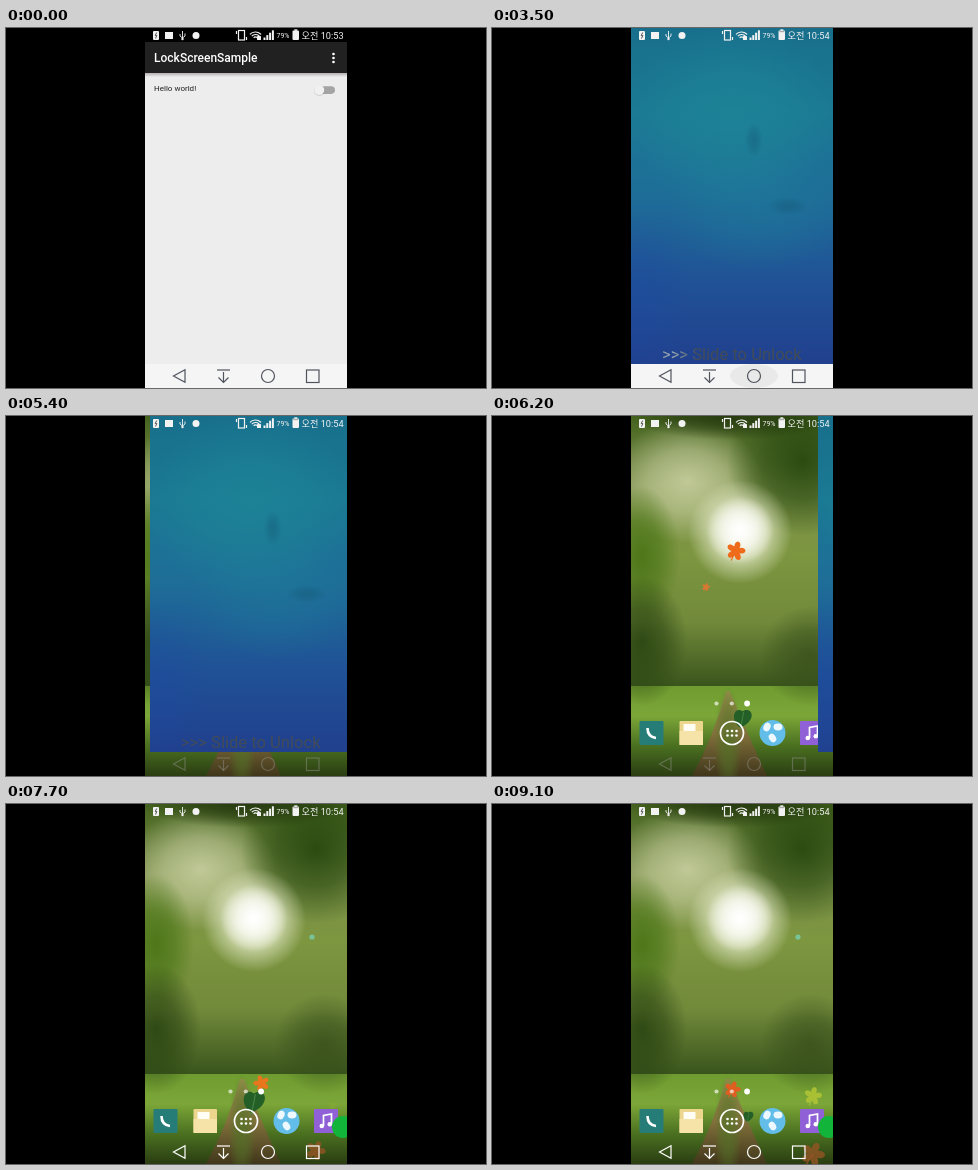
Animation, 480 px wide and 360 px high, one loop 9200 ms. Source, as an HTML page with a canvas:

```html
<!DOCTYPE html>
<html lang="en">
<head>
<meta charset="utf-8">
<title>Lock screen demo</title>
<style>
html, body { margin: 0; width: 100%; height: 100%; overflow: hidden; background: #000; }
canvas { display: block; }
</style>
</head>
<body>
<canvas id="stage" width="480" height="360"></canvas>
<script>
const LOOP = 9200, STEP = 100;
const L = 139, W = 202, H = 360, NAV = 336;
const FONT = 'Roboto, "Noto Sans CJK KR", "Noto Sans CJK", sans-serif';
const ctx = document.getElementById('stage').getContext('2d');

const clamp = v => Math.max(0, Math.min(1, v));
const ramp = (t, a, b) => clamp((t - a) / (b - a));
const smooth = u => u * u * (3 - 2 * u);

function layer(draw) {
  const c = document.createElement('canvas');
  c.width = W;
  c.height = H;
  const g = c.getContext('2d');
  g.translate(-L, 0);
  draw(g);
  return c;
}

// Evenly spaced vertical gradient
function vertical(g, y0, y1, ...colors) {
  const f = g.createLinearGradient(0, y0, 0, y1);
  colors.forEach((c, i) => f.addColorStop(i / (colors.length - 1), c));
  return f;
}

function band(g, y, h, ...colors) {
  g.fillStyle = colors.length > 1 ? vertical(g, y, y + h, ...colors) : colors[0];
  g.fillRect(L, y, W, h);
}

function glow(g, x, y, rx, ry, hsl, alpha) {
  g.save();
  g.translate(x, y);
  g.scale(rx, ry);
  const f = g.createRadialGradient(0, 0, 0, 0, 0, 1);
  f.addColorStop(0, `hsl(${hsl} / ${alpha})`);
  f.addColorStop(0.5, `hsl(${hsl} / ${alpha * 0.65})`);
  f.addColorStop(1, `hsl(${hsl} / 0)`);
  g.fillStyle = f;
  g.fillRect(-1, -1, 2, 2);
  g.restore();
}

function line(...pts) {
  ctx.beginPath();
  for (let i = 0; i < pts.length; i += 2) ctx.lineTo(pts[i], pts[i + 1]);
  ctx.stroke();
}

function disc(x, y, r, color) {
  ctx.fillStyle = color;
  ctx.beginPath();
  ctx.arc(x, y, r, 0, 7);
  ctx.fill();
}

function ring(x, y, r, from = 0, to = 7) {
  ctx.beginPath();
  ctx.arc(x, y, r, from, to);
  ctx.stroke();
}

function box(x, y, w, h, r, color) {
  ctx.fillStyle = color;
  ctx.beginPath();
  ctx.roundRect(x, y, w, h, r);
  ctx.fill();
}

function pen(color, width) {
  ctx.strokeStyle = color;
  ctx.lineWidth = width;
}

function text(str, x, y, size, color, weight = 400) {
  ctx.font = `${weight} ${size}px ${FONT}`;
  ctx.fillStyle = color;
  ctx.fillText(str, x, y);
}

// The woodland photo as soft tones: canopy, glade, undergrowth, meadow, path, sun
const forest = layer(g => {
  band(g, 0, 275, '#45641f', '#7b8f4a', '#7d9640', '#71893a', '#35501a');
  band(g, 270, 90, '#6f9c30', '#7ca638', '#4a7020', '#2a3d12');
  glow(g, 195, 65, 75, 62, '66 38% 78%', 0.75);
  glow(g, 310, 45, 75, 75, '95 70% 16%', 0.9);
  glow(g, 150, 140, 38, 70, '88 72% 26%', 0.85);
  glow(g, 150, 225, 45, 65, '92 60% 16%', 0.85);
  glow(g, 318, 240, 50, 50, '88 50% 20%', 0.7);
  glow(g, 240, 0, 105, 24, '88 60% 12%', 0.8);
  g.fillStyle = vertical(g, 275, H, '#94904a', '#82713c', '#40361a');
  g.beginPath();
  g.moveTo(234, 275);
  g.quadraticCurveTo(222, 320, 200, H);
  g.lineTo(275, H);
  g.quadraticCurveTo(252, 310, 238, 275);
  g.fill();
  glow(g, 236, 325, 14, 55, '85 50% 30%', 0.8);
  glow(g, 248, 116, 52, 52, '65 60% 92%', 1);
  glow(g, 248, 114, 34, 34, '0 0% 100%', 1);
});

const wall = layer(g => {
  band(g, 0, NAV, '#186f8c', '#1b7994', '#1e6d98', '#205296', '#21408e');
  glow(g, 240, 90, 105, 95, '186 66% 36%', 0.5);
  glow(g, 265, 185, 90, 60, '194 68% 36%', 0.4);
  glow(g, 139, 270, 60, 85, '220 70% 37%', 0.4);
  glow(g, 262, 112, 9, 18, '198 70% 26%', 0.4);
  glow(g, 296, 178, 20, 9, '198 70% 26%', 0.4);
});

function statusBar(t) {
  const white = '#f2f2f2';
  box(147, 3, 6, 9, 1, white);
  pen('#555', 1);
  line(150.7, 4.5, 149.2, 7.5, 150.8, 7.5, 149.5, 10.5);
  box(159, 4, 8, 7, 0, white);
  pen(white, 0.9);
  line(176.5, 3, 176.5, 12);
  line(174, 6, 174, 8, 176.5, 10, 179, 8, 179, 5.5);
  disc(176.5, 11, 1.2, white);
  disc(190, 7.5, 3.5, white);

  pen(white, 1.2);
  ctx.strokeRect(232.5, 2.5, 6, 9.5);
  line(230.5, 3, 230.5, 6);
  line(240.5, 9, 240.5, 12);
  for (let r = 2.5; r < 8; r += 2.5) ring(249.5, 11.5, r, -2.4, -0.74);
  box(251, 8, 4, 4, 0.5, white);
  for (let i = 0; i < 4; i++) ctx.fillRect(257.5 + i * 2.8, 9.5 - i * 2.4, 2, 2.5 + i * 2.4);
  text('79%', 270.5, 10, 7, white);
  box(286.5, 2.5, 6.5, 9.5, 1, white);
  ctx.fillRect(288.3, 1.3, 3, 1.5);
  if (t >= 1000) box(287.3, 3, 5, 1.2, 0, '#aaa');
  text(t < 700 ? '오전 10:53' : '오전 10:54', 295.5, 10.5, 9.2, white);
}

function navBar(color) {
  pen(color, 1.2);
  line(179, 348, 179, 341.8, 167.5, 348, 179, 354.2, 179, 348);
  line(211, 342, 224, 342);
  line(217.5, 344, 217.5, 354.5);
  line(212.5, 349.5, 217.5, 354.5, 222.5, 349.5);
  ring(262, 348, 6.5);
  ctx.strokeRect(300.5, 342, 12.5, 12.5);
}

function lightNav(t) {
  band(ctx, NAV, H - NAV, '#f5f5f5');
  const press = ramp(t, 3300, 3500) * (1 - ramp(t, 3600, 3900));
  ctx.fillStyle = `rgba(0,0,0,${0.05 * press})`;
  ctx.beginPath();
  ctx.ellipse(262, 348, 24, 12, 0, 0, 7);
  ctx.fill();
  navBar('#50545e');
}

function app(t) {
  band(ctx, 0, 14, '#000');
  band(ctx, 14, 31, '#212121');
  band(ctx, 45, NAV - 45, '#ededed');
  band(ctx, 45, 4, '#b5aeb2', '#ededed');
  text('LockScreenSample', 148, 34, 12, '#fff', 500);
  for (let y = 26; y <= 34; y += 4) disc(327.5, y, 1.35, '#fff');
  text('Hello world!', 148, 63, 8, '#222');

  const on = smooth(ramp(t, 1700, 2200)), x = 313.3 + 12 * on;
  box(311, 58.3, 18, 7.6, 3.8, on > 0.5 ? '#82c4be' : '#a4a4a4');
  disc(x, 62.6, 5.3, 'rgba(0,0,0,.12)');
  disc(x, 62, 5, on > 0.5 ? '#009688' : '#f1f1f1');
  lightNav(t);
}

function dock() {
  for (let i = 0; i < 3; i++) {
    disc(224.5 + i * 15.3, 287.5, i < 2 ? 2.1 : 2.9, i < 2 ? 'rgba(255,255,255,.65)' : '#fff');
  }

  box(147.5, 305, 24, 24, 1, '#267d77');
  pen('#fff', 2.6);
  ctx.beginPath();
  ctx.moveTo(155.5, 312);
  ctx.quadraticCurveTo(155.5, 321, 164, 322);
  ctx.stroke();

  box(187.5, 305, 23.5, 24, 1, '#ecd58c');
  box(191.5, 308, 12, 7, 0.5, '#fffdf4');
  box(187.5, 315, 23.5, 14, 0, '#f5e3a8');

  pen('#fff', 1.7);
  ring(240, 317, 11.5);
  for (let i = 0; i < 6; i++) disc(235.5 + (i % 3) * 4.5, 315 + (i > 2 ? 4.5 : 0), 1.3, '#fff');

  disc(280.5, 317, 13, '#62bde8');
  for (let i = 0; i < 3; i++) {
    ctx.beginPath();
    ctx.ellipse(275 + i * 5.5, 311 + (i % 2) * 11, 4.5, 3.4, 2 - i, 0, 7);
    ctx.fillStyle = '#eef9ff';
    ctx.fill();
  }

  box(308, 305, 24, 24, 1, '#9060d6');
  line(317.5, 322, 317.5, 311.5, 325.5, 310, 325.5, 320);
  disc(315.8, 322, 2.3, '#fff');
  disc(323.8, 320.3, 2.3, '#fff');
  disc(337, 323, 11, '#12b53a');
}

function leaf(x, y, size, color, alpha, turn) {
  ctx.save();
  ctx.globalAlpha = alpha;
  ctx.translate(x, y);
  ctx.rotate(turn);
  ctx.scale(size, size);
  ctx.fillStyle = color;
  ctx.beginPath();
  for (let a = 0; a < 6.28; a += 0.1) {
    const r = 0.45 + 0.55 * Math.abs(Math.cos(2.5 * a));
    ctx.lineTo(r * Math.sin(a), -r * Math.cos(a));
  }
  ctx.fill();
  pen(color, 0.12);
  line(0, 0, -0.2, 1.1);
  ctx.restore();
}

function ivy(x, y, s) {
  ctx.save();
  ctx.translate(x, y);
  ctx.scale(s, s);
  ctx.fillStyle = '#245f28';
  ctx.beginPath();
  ctx.moveTo(-0.3, 0.95);
  ctx.bezierCurveTo(-1.3, 0.3, -0.9, -1.1, -0.1, -0.55);
  ctx.bezierCurveTo(0.7, -1.1, 1.4, 0.2, -0.3, 0.95);
  ctx.fill();
  pen('#4c8745', 0.08);
  line(0, -0.5, -0.3, 1.1);
  ctx.restore();
}

// Leaves drop out of the sunlight, growing as they speed up
const falling = [
  { start: 5400, x: 246, drift: -4, size: 18, color: '#ee6b1c' },
  { start: 5200, x: 222, drift: -12, size: 6, color: '#d97832' },
  { start: 6350, x: 250, drift: 6, size: 9, color: '#e8761c' },
  { start: 7735, x: 247, drift: -7, size: 9, color: '#e05f20' }
];

function leaves(t) {
  for (const { start, x, drift, size, color } of falling) {
    const u = (t - start) / 1500;
    if (u > 0 && u < 1) {
      leaf(x + drift * u, 97 + 250 * u ** 3, size * u, color, ramp(u, 0.35, 0.5), 0.3 * Math.sin(t / 450));
    }
  }
  const sway = Math.cos((t - 7100) / 600);
  ivy(252 - 5 * sway, 302 - 10 * sway, 10.5 + 4.5 * sway);
  const rest = (t - 7100) / 1000;
  leaf(305 + 8 * rest, 345 + 2.5 * rest, 9 + 1.5 * rest, '#9a5626', 0.75 * ramp(t, 6700, 7100), 0.4);
  leaf(329 - 4 * rest, 306 - 7 * rest, 2 + 3.5 * rest, '#a9c035', ramp(t, 7600, 8300), 0.2);
}

function home(t) {
  ctx.drawImage(forest, L, 0);
  leaves(t);
  disc(306, 133, 2.6, `rgba(120,215,190,${0.7 * ramp(t, 6700, 7100)})`);
  dock();
  navBar(t < 7600 ? 'rgba(150,150,145,.45)' : '#fff');
}

function lock(t, dx) {
  ctx.drawImage(wall, 0, 0, W, NAV, L + dx, 0, W, NAV);
  const shine = 165 + dx + ((t - 750) % 2600) * 0.09;
  const f = ctx.createLinearGradient(shine - 26, 0, shine + 26, 0);
  ['#414b57', '#9fb0ba', '#414b57'].forEach((c, i) => f.addColorStop(i / 2, c));
  text('>>> Slide to Unlock', 170 + dx, 332, 16.6, f);
}

function render(t) {
  ctx.fillStyle = '#000';
  ctx.fillRect(0, 0, 480, H);
  ctx.save();
  ctx.beginPath();
  ctx.rect(L, 0, W, H);
  ctx.clip();

  if (t < 2600) app(t);
  else if (t < 3900) lightNav(t);
  else home(t);

  const slide = ramp(t, 5300, 6380);
  if (t >= 2600 && slide < 1) lock(t, W * smooth(slide));
  statusBar(t);

  // Screen goes dark, then wakes on the lock screen
  const dark = t < 2600 ? ramp(t, 2300, 2600) : 1 - ramp(t, 2600, 2900);
  band(ctx, 0, H, `rgba(0,0,0,${dark})`);
  ctx.restore();
}

function tick() {
  const t = performance.now() % LOOP;
  render(Math.floor(t / STEP) * STEP);
  requestAnimationFrame(tick);
}
tick();
</script>
</body>
</html>
```
